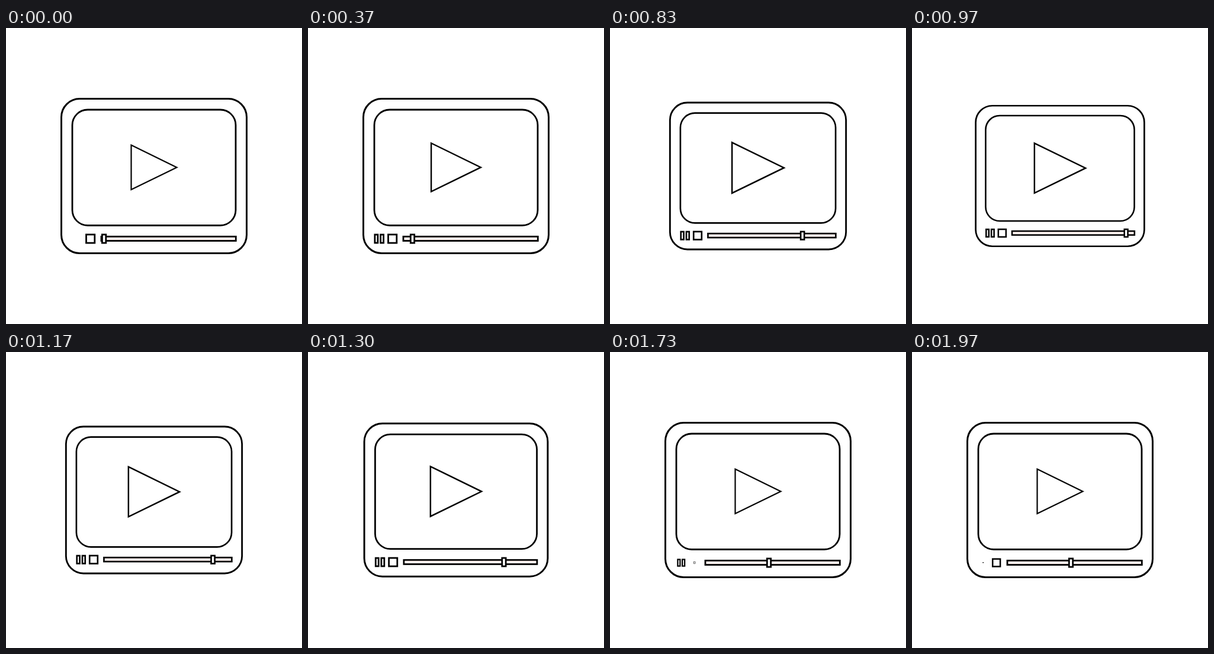
These frames come from a looping animation (500 by 500 pixels, 2000 ms). An HTML page:

```html
<!DOCTYPE html>
<html lang="en">
<head>
<meta charset="utf-8">
<title>Video player</title>
<style>
  html, body { margin: 0; width: 100%; height: 100%; overflow: hidden; background: #fff; }
  svg { display: block; width: 100%; height: 100%; }
</style>
</head>
<body>
<svg viewBox="0 0 500 500" fill="#fff" stroke="#000" stroke-width="2.8" stroke-miterlimit="10">
  <g id="player">
    <rect x="93.5" y="119.5" width="313" height="261" rx="31" stroke-width="3"/>
    <rect x="112" y="138" width="276" height="195.5" rx="26"/>
    <path id="play" d="M211.5 197.8 L288.5 235.4 L211.5 273 Z" stroke-width="2.2"/>
    <g id="pause">
      <rect x="112.9" y="349" width="5" height="14"/>
      <rect x="122.6" y="349" width="5" height="14"/>
    </g>
    <rect id="stop" x="135.5" y="348.9" width="14.3" height="14.2"/>
    <rect x="161" y="352.3" width="227.3" height="7.2" fill="#fff3f0"/>
    <rect id="knob" x="-3.2" y="348.9" width="6.4" height="14.2"/>
  </g>
</svg>
<script>
  const LOOP = 2000;
  const part = id => document.getElementById(id);
  const [player, play, pause, stop, knob] = ["player", "play", "pause", "stop", "knob"].map(part);

  // Keys are [time in thirds of a second, value] pairs, joined linearly.
  function tween(time, keys) {
    const t = time * 3 / 1000;
    const next = keys.findIndex(([at]) => at > t);
    if (next === 0) return keys[0][1];
    if (next < 0) return keys[keys.length - 1][1];
    const [t0, v0] = keys[next - 1], [t1, v1] = keys[next];
    return v0 + (v1 - v0) * (t - t0) / (t1 - t0);
  }

  function scale(node, x, y, s) {
    node.setAttribute("transform", `translate(${x} ${y}) scale(${s}) translate(${-x} ${-y})`);
    node.setAttribute("visibility", s > 0.001 ? "visible" : "hidden");
  }

  // Thirty pictures a second, held for 30, 40 and 30 ms in turn.
  function snap(ms) {
    const rest = ms % 100;
    const step = rest < 30 ? 0 : rest < 70 ? 1 : 2;
    return Math.floor(ms / 100) * 100 + step * 100 / 3;
  }

  function draw(ms) {
    const t = snap(ms % LOOP);
    scale(player, 250, 250, tween(t, [[2, 1], [3, 0.9], [4, 1]]));
    scale(play, 250, 235.4, tween(t, [[0, 1], [3, 1.24], [5, 1]]));
    scale(pause, 120.4, 356, tween(t, [[0, 0], [1, 1], [5, 1], [6, 0]]));
    scale(stop, 142.6, 356, tween(t, [[4, 1], [5, 0], [6, 1]]));
    const x = tween(t, [[1, 165.6], [3, 383.6], [5, 268.5]]);
    knob.setAttribute("transform", `translate(${x} 0)`);
  }

  const start = performance.now();
  function tick() {
    draw(performance.now() - start);
    requestAnimationFrame(tick);
  }
  tick();
</script>
</body>
</html>
```
